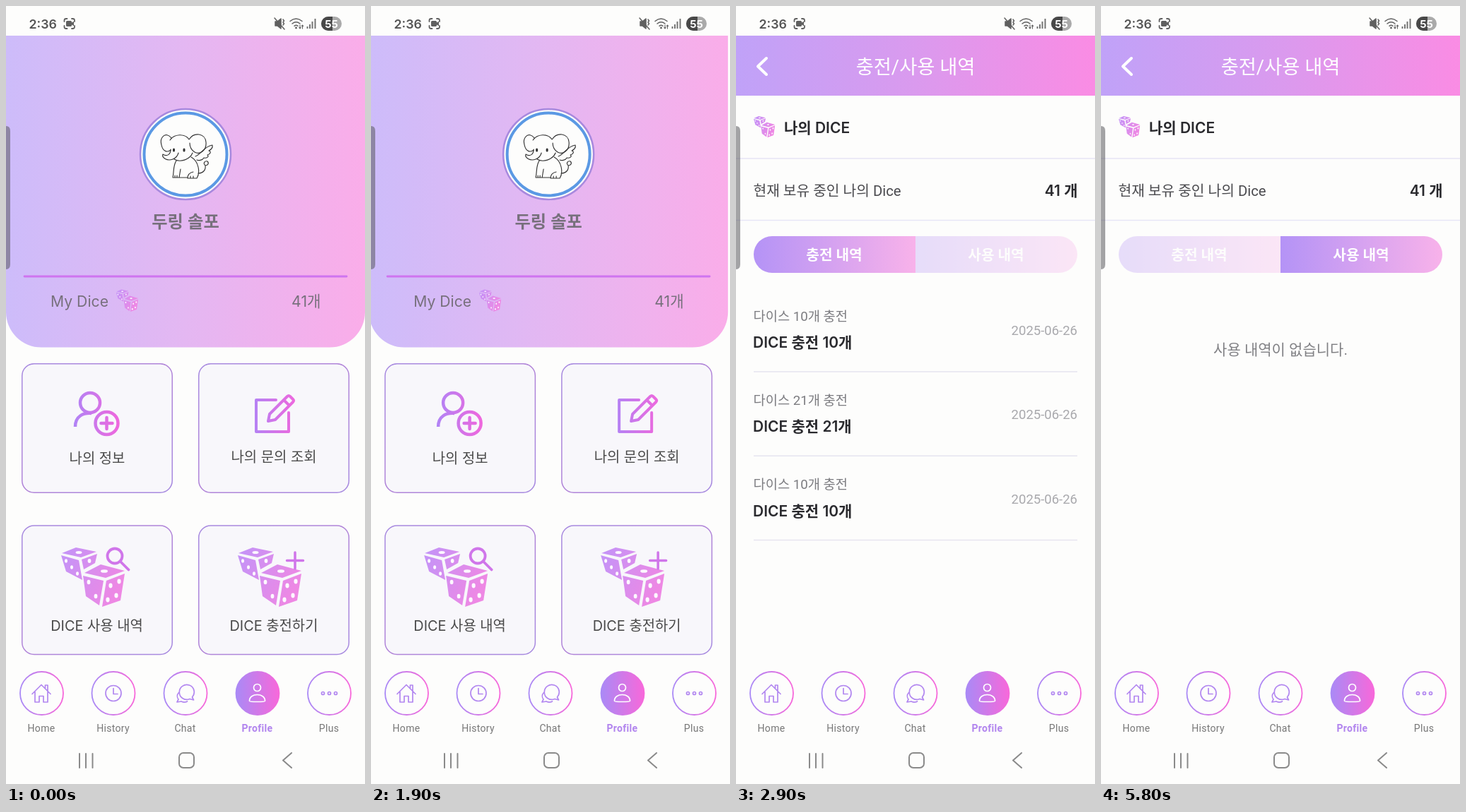
Animation of 508x1102 px, one loop 6200 ms. Source, as an HTML page:

```html
<!DOCTYPE html>
<html lang="ko">
<head>
<meta charset="utf-8">
<title>My Dice</title>
<style>
html, body { margin: 0; width: 100%; height: 100%; overflow: hidden; background: #fdfdfc; }
svg { display: block; width: 100vw; height: 100vh; }
text { font-family: Roboto, 'Noto Sans CJK KR', 'Noto Sans CJK', sans-serif; }
.inter { font-family: Inter, 'Noto Sans CJK KR', 'Noto Sans CJK', sans-serif; }
.mid { text-anchor: middle; }
.end { text-anchor: end; }
.line { fill: none; stroke-linecap: round; stroke-linejoin: round; }
.card { font-size: 19.9px; fill: #4a4a4a; text-anchor: middle; }
.nav { font-size: 14px; letter-spacing: .3px; fill: #777; text-anchor: middle; }
.strong { font-weight: 600; font-size: 21px; fill: #2a2a2e; }
.tab { font-size: 20.2px; font-weight: 700; fill: #fff; text-anchor: middle; }
</style>
</head>
<body>
<svg viewBox="0 0 508 1102" preserveAspectRatio="none">
<defs>
  <linearGradient id="hero"><stop stop-color="#cdbcfa"/><stop offset=".5" stop-color="#e4b7f2"/><stop offset="1" stop-color="#faade9"/></linearGradient>
  <linearGradient id="bar"><stop stop-color="#c0a2f8"/><stop offset=".5" stop-color="#da9aee"/><stop offset="1" stop-color="#fa8ce4"/></linearGradient>
  <linearGradient id="tab"><stop stop-color="#b493f6"/><stop offset="1" stop-color="#f8b2ea"/></linearGradient>
  <linearGradient id="edge" x2="1" y2="1"><stop stop-color="#a78ae0"/><stop offset=".5" stop-color="#b184d8"/><stop offset="1" stop-color="#a78ae0"/></linearGradient>
  <linearGradient id="ring" gradientUnits="userSpaceOnUse" x1="-31" x2="31" y1="0" y2="0"><stop stop-color="#a98af6"/><stop offset="1" stop-color="#f868da"/></linearGradient>
  <linearGradient id="icon" gradientUnits="userSpaceOnUse" x1="-34" x2="34" y1="0" y2="0"><stop stop-color="#b084f6"/><stop offset="1" stop-color="#f266dc"/></linearGradient>
  <linearGradient id="die" gradientUnits="userSpaceOnUse" x1="0" x2="90" y1="0" y2="40"><stop stop-color="#c294f8"/><stop offset="1" stop-color="#ee88e4"/></linearGradient>
  <g id="dice">
    <path fill="url(#die)" d="M1 8L21 0L50 6L28 14ZM0 11L25 18L30 46L7 34ZM29 17L51 9L48 22L32 31Z
      M33 36L56 24L90 33L63 43ZM31 40L60 47L54 82L35 69ZM64 47L90 37L84 75L58 84Z"/>
    <g fill="#fdf8ff">
      <ellipse cx="25" cy="7" rx="4.5" ry="2"/>
      <ellipse cx="7" cy="19" rx="2" ry="2.8"/><ellipse cx="15" cy="28" rx="2" ry="2.8"/><ellipse cx="23" cy="37" rx="2" ry="2.8"/>
      <ellipse cx="40" cy="19" rx="2.4" ry="3"/>
      <ellipse cx="61" cy="33.500" rx="5" ry="2.300"/>
      <ellipse cx="39" cy="49" rx="2.400" ry="3.200"/><ellipse cx="49" cy="69" rx="2.400" ry="3.200"/>
      <ellipse cx="70" cy="54" rx="2.600" ry="3.400"/><ellipse cx="82" cy="48" rx="2.600" ry="3.400"/>
      <ellipse cx="66" cy="74" rx="2.600" ry="3.400"/><ellipse cx="78" cy="68" rx="2.600" ry="3.400"/>
    </g>
  </g>
  <rect id="cardBox" width="212.5" height="182.5" rx="17" fill="#f8f7fb" stroke="url(#edge)" stroke-width="1.5"/>
</defs>
<rect width="508" height="1102" fill="#fdfdfc"/>

<g id="profile">
  <path d="M0 42H508V433A50 50 0 0 1 458 483.500H50A50 50 0 0 1 0 433Z" fill="url(#hero)"/>
  <circle cx="254" cy="210" r="64" fill="#fdfdfc" stroke="#a889de" stroke-width="2.5"/>
  <circle cx="254" cy="210" r="58.5" fill="#fdfdfc" stroke="#5b99e4" stroke-width="4"/>
  <g class="line" stroke="#333" stroke-width="1.15">
    <path d="M234 187C226 177 217 186 220 197C222 206 228 208 233 204M232 190C238 181 253 180 259 189M259 189C266 178 282 180 283 193C284 205 274 211 267 207C262 204 260 199 260 194"/>
    <path d="M233 203C233 210 228 214 222 210C220 215 228 220 236 217C241 215 243 212 244 208M238 217C246 222 260 218 264 208M241 219C236 227 238 234 236 243H245L247 231M262 214C273 220 275 236 270 244H257C257 239 260 236 265 235M245 243H257M239 240v3M242 240v3M261 241v3M265 241v3"/>
    <path d="M268 213C276 210 280 199 292 197C293 202 289 204 287 205C291 206 289 210 285 211C288 213 284 216 280 215C278 219 272 219 270 218M272 237C279 237 283 232 282 226M282 226C278 222 282 219 285 220C288 223 285 226 282 226"/>
    <path d="M237.5 203v2M252 203v2" stroke-width="3"/>
  </g>
  <text class="mid" x="254" y="314" font-size="24.3" font-weight="700" fill="#77707c">두링 솔포</text>
  <path class="line" d="M26 383H482" stroke="#cf74f0" stroke-width="2.8"/>
  <g font-size="21.2" fill="#77707c">
    <text class="inter" x="63" y="426">My Dice</text>
    <text class="inter end" x="445.5" y="426">41개</text>
  </g>
  <use href="#dice" transform="translate(156 401.5) scale(.345 .375)"/>

  <use href="#cardBox" x="22.75" y="506.75"/><use href="#cardBox" x="272.75" y="506.75"/>
  <use href="#cardBox" x="22.75" y="736"/><use href="#cardBox" x="272.75" y="736"/>
  <g class="line" stroke="url(#icon)" stroke-width="4.5" transform="translate(129 578)">
    <circle cx="-10" cy="-16" r="14"/><path d="M-31 18C-31 3 -20 -2 -8 -1" stroke-linecap="butt"/>
    <circle cx="13.5" cy="13" r="16"/><path d="M5.5 13H21.5M13.5 5V21"/>
  </g>
  <g class="line" stroke="url(#icon)" stroke-width="4" transform="translate(380 578)">
    <path d="M2 -20H-26V25H20V-2M-9 10L-7 0L18 -25Q20 -27 22 -25L26 -21Q28 -19 26 -17L1 8ZM13 -20L21 -12"/>
  </g>
  <use href="#dice" x="78" y="767"/><use href="#dice" x="328" y="767"/>
  <g class="line" stroke="#d076ea" stroke-width="3.8">
    <circle cx="154" cy="779" r="10.5"/><path d="M162 787L173.5 798.5"/>
    <path d="M397.500 785.500H420.500M409 774V797" stroke-width="3.5"/>
  </g>
  <g class="inter">
    <text class="card inter" x="129" y="647.5">나의 정보</text>
    <text class="card inter" x="379" y="645.5">나의 문의 조회</text>
    <text class="card inter" x="128.5" y="884.5">DICE 사용 내역</text>
    <text class="card inter" x="379" y="884.5">DICE 충전하기</text>
  </g>
</g>

<g id="detail">
  <rect y="42" width="508" height="900" fill="#fdfdfc"/>
  <rect y="42" width="508" height="85" fill="url(#bar)"/>
  <path class="line" d="M43 74L31 85.5L43 97" stroke="#fff" stroke-width="4"/>
  <text class="mid" x="254" y="95.5" font-size="27.3" fill="#fff">충전/사용 내역</text>
  <use href="#dice" transform="translate(25 156) scale(.335 .36)"/>
  <text class="inter strong" x="68" y="180">나의 DICE</text>
  <path d="M0 216H508M0 303.5H508" stroke="#e7e5f6" stroke-width="1.6"/>
  <text x="24.5" y="268.5" font-size="20.3" fill="#4a4a4e">현재 보유 중인 나의 Dice</text>
  <text class="inter strong end" x="483.5" y="268.5">41 개</text>
  <g id="tabL">
    <path d="M254 326H51a26 26 0 0 0 0 52H254Z" fill="url(#tab)"/>
    <text class="tab" x="139" y="360">충전 내역</text>
  </g>
  <g id="tabR">
    <path d="M254 326H457a26 26 0 0 1 0 52H254Z" fill="url(#tab)"/>
    <text class="tab" x="368" y="360">사용 내역</text>
  </g>
  <g id="rows"></g>
  <text id="empty" class="mid" x="254" y="493.5" font-size="21" fill="#808084">사용 내역이 없습니다.</text>
</g>

<rect width="508" height="42" fill="#fdfdfc"/>
<text class="inter" x="32.5" y="31.5" font-size="17.8" font-weight="600" fill="#555">2:36</text>
<g class="line" stroke="#606060" stroke-width="1.8">
  <path d="M82.5 22v-1.5q0-2.500 2.500-2.500h1.500M93 18h1.500q2.500 0 2.500 2.500v1.500M97 28v1.500q0 2.500-2.500 2.500h-1.500M86.500 32h-1.500q-2.500 0-2.500-2.500v-1.500"/>
</g>
<path id="cam" d="M86.5 21H91.5Q93 21 93 22.5V23.5L96 21.8V28.2L93 26.5V27.5Q93 29 91.5 29H86.5Q85 29 85 27.5V22.5Q85 21 86.5 21Z" fill="#606060"/>
<g class="line" stroke="#606060" stroke-width="1.5">
  <path d="M381 22h3l5-4v14l-5-4h-3z" fill="#606060"/><path d="M380 17L394 33M392 19l1.500 2-1.500 2 1.500 2-1.500 2"/>
  <path d="M402 21.500q8.500-7 17 0M405 25q5.500-4.500 11 0M408 28.300q2.500-2 5 0"/><circle cx="410.500" cy="31" r=".7"/>
  <path d="M416 27v5M414.800 30.500l1.200 1.500 1.200-1.500M419.500 32v-5M418.300 28.500l1.200-1.500 1.200 1.500" stroke-width="1.1"/>
</g>
<path d="M426.5 32v-3M430 32v-6M433.5 32v-10M437.5 32V18" stroke="#707070" stroke-width="1.9"/>
<rect x="446" y="15" width="29" height="20" rx="10" fill="#aaa"/>
<path d="M462 15H456a10 10 0 0 0 0 20H462Z" fill="#484848"/>
<text class="mid inter" x="460.5" y="30.5" font-size="15" font-weight="700" fill="#fff">55</text>

<rect y="930" width="508" height="172" fill="#fdfdfc"/>
<g id="nav"></g>
<g class="line" stroke="#8a8a8a" stroke-width="2">
  <path d="M104 1059V1079M113 1059V1079M122.5 1059V1079M404 1058L392 1068.5L404 1079"/>
  <rect x="245" y="1058" width="21" height="21" rx="6"/>
</g>
<path d="M0 170Q6 170 6 177V366Q6 373 0 373Z" fill="#5a5a5f" fill-opacity=".55"/>
</svg>
<script>
const LOOP = 6200, PUSH = 1865, PUSH_LEN = 450, SHIFT = 50.8;
const PRESS = 4380, SWAP = 4480, DIM = 0.3;
const BLINK = [400, 900, 1400, 1900, 2400, 2900, 3400, 3800, 4400, 4800, 5300, 5800];
const $ = id => document.getElementById(id);
const clamp = v => Math.min(1, Math.max(0, v));

$('rows').innerHTML = [10, 21, 10].map((n, i) => `<g transform="translate(0 ${i * 119.3})">
  <text x="24.5" y="445.5" font-size="18.7" fill="#7c7c80">다이스 ${n}개 충전</text>
  <text class="inter strong" x="24" y="484">DICE 충전 ${n}개</text>
  <text class="end" x="483" y="466" font-size="18.5" fill="#a9a9ad">2025-06-26</text>
  <path d="M25 518H483" stroke="#e6e4f0" stroke-width="1.5"/></g>`).join('');

const items = [
  ['Home', 50.5, '<path d="M-13.5 1L-.5-12L12.5 1M-9.5-2V12.5H-3.5V4H2.5V12.5H8.5V-2M5-7V-11.5H8.5V-3.5"/>'],
  ['History', 152, '<circle r="11"/><path d="M0-7V1H6"/>'],
  ['Chat', 254, '<path d="M9.5 5.5L11.5 9.5L6 8A10.5 10.5 0 1 1 9.5 5.5ZM-9.5-1C-12.500 2-12 6-10 8.500L-12 12.500L-6 11.500C-3 13 0 13 2.500 11.500"/>'],
  ['Profile', 356, '<circle cx="-.5" cy="-8" r="5"/><path d="M-11.5 11C-12-1 11-1 10.5 11Q10.5 12-.5 12Q-11.5 12-11.5 11Z"/>'],
  ['Plus', 457.5, '<circle cx="-9" r="2"/><circle r="2"/><circle cx="9" r="2"/>']
];
$('nav').innerHTML = items.map(([name, x, art]) => {
  const on = name === 'Profile';
  return `<g transform="translate(${x} 973.5)">
    <circle r="30.5" fill="${on ? 'url(#ring)' : '#fdfdfc'}" stroke="url(#ring)" stroke-width="1.8"/>
    <g class="line" stroke="${on ? '#fff' : '#b287f0'}" stroke-width="1.7">${art}</g>
    <text class="nav" x="-.5" y="54.5" ${on ? 'style="font-weight:700;fill:#b184ee"' : ''}>${name}</text></g>`;
}).join('');

const cubic = (a, b, c, d, u) => {
  const v = 1 - u;
  return v * v * v * a + 3 * v * v * u * b + 3 * v * u * u * c + u * u * u * d;
};

// Fast start, long settle: two joined cubic curves
function emphasized(x) {
  if (x <= 0 || x >= 1) return clamp(x);
  const [xs, ys] = x < 1 / 6
    ? [[0, 0.05, 0.1333, 1 / 6], [0, 0, 0.06, 0.4]]
    : [[1 / 6, 0.2083, 0.25, 1], [0.4, 0.82, 1, 1]];
  let lo = 0, hi = 1;
  for (let i = 0; i < 24; i++) {
    const m = (lo + hi) / 2;
    if (cubic(...xs, m) < x) lo = m; else hi = m;
  }
  return cubic(...ys, lo);
}

function draw(t) {
  const age = t - PUSH, p = emphasized(age / PUSH_LEN);
  $('profile').setAttribute('transform', `translate(${-SHIFT * p} 0)`);
  $('detail').setAttribute('transform', `translate(${SHIFT * (1 - p)} 0)`);
  $('detail').setAttribute('opacity', clamp((age - 50) / 83));

  const used = t >= SWAP;
  const press = DIM - 0.06 * clamp((t - PRESS) / 20);
  $('tabL').setAttribute('opacity', used ? DIM : 1);
  $('tabR').setAttribute('opacity', used ? press + (1 - press) * clamp((t - SWAP) / 270) : press);
  $('rows').style.display = used ? 'none' : '';
  $('empty').style.display = used ? '' : 'none';

  const flips = BLINK.filter(b => t >= b).length;
  $('cam').style.display = flips % 2 ? 'none' : '';
}

const start = performance.now();
function tick() {
  draw((performance.now() - start) % LOOP);
  requestAnimationFrame(tick);
}
tick();
</script>
</body>
</html>
```
